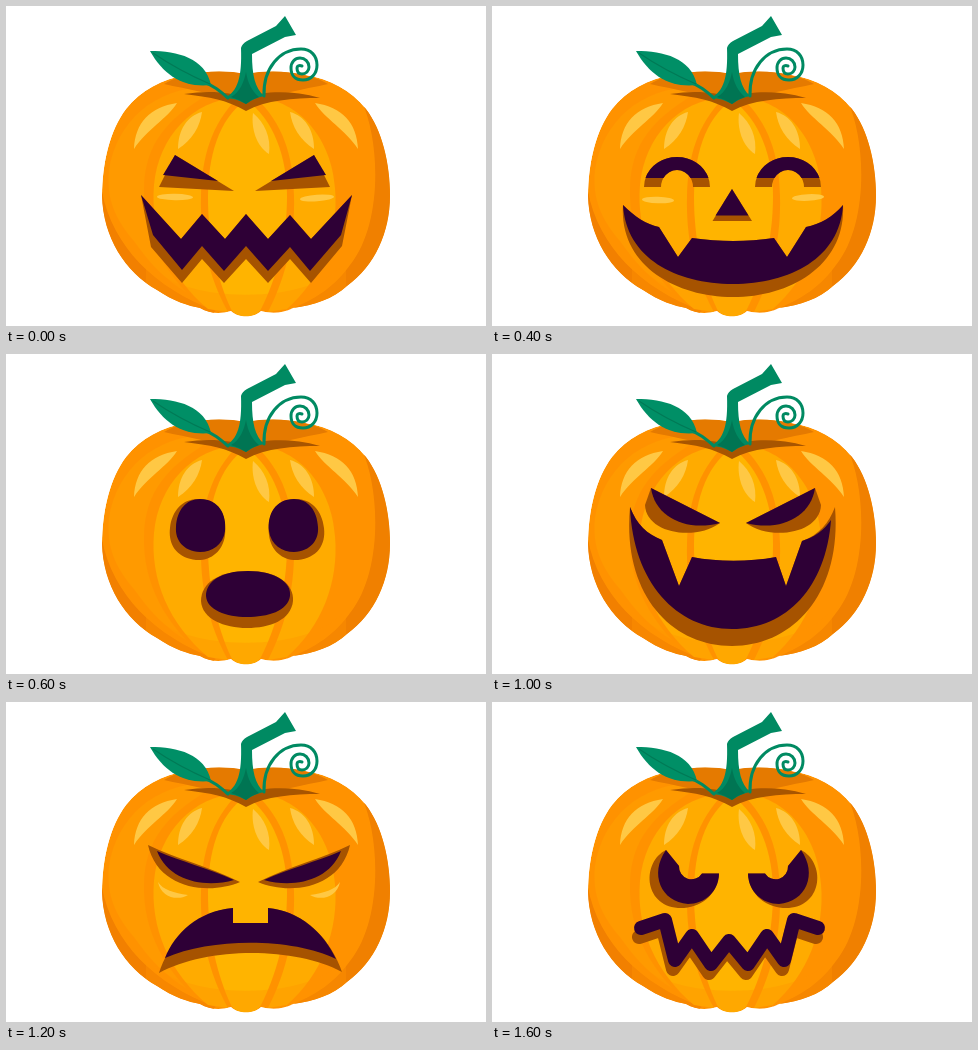
An HTML page for the animation above (1800 ms loop, 480 by 320 pixels).

```html
<!DOCTYPE html>
<html lang="en">
<head>
<meta charset="utf-8">
<title>Pumpkin faces</title>
<style>
  html, body { margin: 0; width: 100%; height: 100%; overflow: hidden; background: #fff; }
  svg { display: block; width: 480px; height: 320px; }
  .face { opacity: 0; }
  .cut { fill: #a65300; }
  .hole { fill: #2e0036; }
  .shine { fill: #ffc844; }
  .line { fill: none; stroke-width: 14; stroke-linecap: round; stroke-linejoin: round; }
  .cut.line { fill: none; stroke: #a65300; }
  .hole.line { fill: none; stroke: #2e0036; }
</style>
</head>
<body>
<svg id="stage" viewBox="0 0 480 320">
  <defs>
    <clipPath id="skin"><path id="body" d="M240 68C220 64 198 65 181 69C156 73 135 84 120 103C104 124 96 157 96 190C97 231 119 266 151 284C167 295 183 300 194 302C204 308 215 308 225 305C232 312 248 312 255 305C266 308 278 307 287 302C308 299 327 293 341 280C369 260 384 226 384 190C384 157 376 124 360 103C345 84 324 73 299 69C282 65 260 64 240 68Z"/></clipPath>
  </defs>
  <g clip-path="url(#skin)">
    <use href="#body" fill="#ff9200"/>
    <path fill="#f28000" d="M94 172C100 233 143 280 210 305L190 320L90 300Z"/>
    <path fill="#f08000" d="M356 96C374 135 377 218 344 259C329 280 311 293 280 305L300 320H390V90Z"/>
    <path fill="#ff9a00" d="M214 82C154 76 111 113 103 164C100 192 109 213 128 235C143 257 161 275 180 286C150 254 137 218 138 182C139 139 160 110 214 82Z"/>
    <path fill="#e57a00" d="M158 78C190 58 290 58 322 78C300 83 268 88 240 98C212 88 180 83 158 78Z"/>
    <path fill="#ffab00" d="M232 91C186 95 153 130 148 179C144 226 163 270 202 303L222 306C202 269 194 232 195 190C196 151 205 119 232 91Z"/>
    <path fill="#ffab00" d="M249 91C295 94 326 135 329 182C333 228 316 272 281 303L262 306C282 267 289 228 288 190C287 149 277 117 249 91Z"/>
    <path fill="#ffb400" d="M240 94C212 113 202 152 202 191C202 235 211 273 225 303C230 313 250 313 255 303C271 271 281 234 281 190C281 152 268 113 240 94Z"/>
    <path fill="#ff9200" opacity=".35" d="M140 255C170 300 310 300 340 255V320H140Z"/>
  </g>
  <g class="shine">
    <path d="M128 143C129 117 144 101 171 97C161 113 141 123 128 143Z"/>
    <path d="M172 143C172 124 181 110 196 106C194 121 186 134 172 143Z"/>
    <path d="M247 107C259 117 265 131 263 148C250 140 245 122 247 107Z"/>
    <path d="M308 143C308 124 299 110 284 106C286 121 294 134 308 143Z"/>
    <path d="M352 143C351 117 336 101 309 97C319 113 339 123 352 143Z"/>
  </g>
  <path fill="#a85500" d="M178 88C203 84 224 86 240 92C257 85 285 84 314 92C287 92 260 94 240 105C221 94 204 91 178 88Z"/>
  <g fill="none" stroke="#008a62" stroke-linecap="round" stroke-width="3">
    <path d="M258 90C257 62 274 43 295 43C305 43 311 50 311 59C311 68 305 74 297 74C289 74 285 69 285 62C285 56 289 52 294 52C299 52 303 56 303 61C303 65 300 68 296 68C292 68 291 65 291 62C291 60 293 59 296 60"/>
    <path d="M197 76C207 79 214 85 222 92"/>
  </g>
  <path fill="#008f66" d="M144 45C172 45 199 52 205 79C178 82 158 70 144 45Z"/>
  <path fill="none" stroke="#007a56" stroke-width="1.2" d="M147 47C166 60 183 69 204 78"/>
  <path fill="#008a62" d="M219 92C232 85 236 71 235 42Q236 38 241 35L270 20L279 10L290 29L279 31L246 48C246 69 249 82 258 90Q248 92 240 98Q230 92 219 92Z"/>
  <path fill="#007553" d="M240 98Q232 93 225 91C234 86 238 76 240 66C242 78 246 85 253 91Q246 93 240 98Z"/>
</svg>
<script>
const STEP = 200;
const stage = document.getElementById('stage');

const path = (kind, d) => `<path class="${kind}" d="${d}"/>`;
const carve = (cut, hole) => path('cut', cut) + path('hole', hole);
// Draws a part and its mirror image about x = axis.
const pair = (part, axis) =>
  part + `<g transform="matrix(-1 0 0 1 ${2 * axis} 0)">${part}</g>`;
const cheek = (x, y, rx = 17, tilt = 0) =>
  `<ellipse class="shine" cx="${x}" cy="${y}" rx="${rx}" ry="3.3" transform="rotate(${tilt} ${x} ${y})"/>`;
const zigzag = 'M149 226L173 218L183 258L200 234L219 262L237 239L256 262L275 234L292 258L302 218L326 226';

const faces = [
  // Jagged grin
  pair(carve('M169 149L228 185L153 181Z', 'M169 149L212 175L157 169Z'), 238.5) +
  carve('M135 189L175 233L196 208L219 233L240 208L262 233L284 209L305 233L346 189L336 240L305 277L284 253L262 277L240 253L218 277L196 253L176 277L145 241Z',
        'M135 189L175 233L196 208L219 233L240 208L262 233L284 209L305 233L346 189L335 229L304 265L284 241L262 265L240 240L218 265L196 240L176 264L147 229Z') +
  cheek(169, 191, 18, 1) + cheek(311, 192, 17, -4),

  // Toothed smile
  pair(carve('M178 144L216 186L153 181Z', 'M178 144L209 177L158 173Z'), 240) +
  carve('M240 182L259 214H221Z', 'M240 182L255 207H225Z') +
  carve('M135 199C160 221 181 226 200 228V244H220V230H261V244H281V228C302 225 325 218 347 199C343 254 298 285 240 285S138 254 135 199Z',
        'M135 199C160 221 181 226 200 228V244H220V230H261V244H281V228C302 225 325 218 347 199C339 246 297 272 240 272S143 246 135 199Z') +
  cheek(166, 193, 16) + cheek(314, 193, 16),

  // Happy fangs
  pair(carve('M152 181A33 30 0 0 1 218 181H201A16 17 0 0 0 169 181Z',
             'M153.5 172A33 30 0 0 1 216.5 172H198.5A16 17 0 0 0 171.5 172Z'), 240.5) +
  carve('M240 183L260 215H220.5Z', 'M240 183L256.5 209.5H223.5Z') +
  carve('M131 199C143 211 154 218 167 221L186 251L200 232C228 236 255 236 282 232L295 251L314 221C328 218 341 211 351 199C354 258 300 291 241 291S127 258 131 199Z',
        'M131 199C143 211 154 218 167 221L186 251L200 232C228 236 255 236 282 232L295 251L314 221C328 218 341 211 351 199C348 252 298 278 241 278S134 252 131 199Z') +
  cheek(166, 194, 16, 2) + cheek(316, 191.5, 16, -3),

  // Surprise
  pair(carve('M192 145C213 145 221 161 219 181C217 198 204 207 190 206C171 204 162 191 164 174C166 156 177 145 192 145Z',
             'M194 145C213 145 221 161 219 177C217 191 206 198 194 198C177 197 169 186 170 173C171 156 180 145 194 145Z'), 241) +
  carve('M242 217C272 217 288 230 287 247C285 266 264 274 241 274S196 265 195 247C195 229 213 217 242 217Z',
        'M242 217C270 217 286 229 284 242C282 257 262 263 241 263S201 256 200 242C200 228 214 217 242 217Z'),

  // Sulk
  pair(carve('M181 147C156 161 157 210 198 215C220 217 236 203 237 183C213 181 192 170 181 147Z',
             'M181 147C192 170 213 181 237 183C236 201 223 213 207 212C177 211 164 175 181 147Z') +
       path('shine', 'M159 193C164 207 175 216 190 221C175 228 156 211 159 193Z'), 241.5) +
  carve('M173 273C183 242 211 225 242 225C276 225 304 245 312 273C275 254 210 253 173 273Z',
        'M179 262C190 239 214 225 242 225C272 225 297 241 307 263C276 246 213 245 179 262Z'),

  // Wicked laugh
  pair(carve('M159 134L228 169C204 187 154 180 153 151Z',
             'M159 134L228 169C194 178 163 163 159 134Z'), 241) +
  carve('M138 153C145 171 155 180 170 186L187 232L200 203C226 208 257 208 284 203L294 232L310 187C327 181 337 169 343 153C350 240 301 292 240 292S130 240 138 153Z',
        'M138 153C145 171 155 180 170 186L187 232L200 203C226 208 257 208 284 203L294 232L310 187C323 183 332 176 339 166C334 233 295 275 240 275S141 229 138 153Z'),

  // Scowl
  pair(carve('M142 143C171 157 202 164 234 180C204 193 152 188 142 143Z',
             'M151 149C176 160 202 166 228 178C200 186 163 180 151 149Z') +
       path('shine', 'M152 180C157 188 168 191 182 193C172 199 155 196 152 180Z'), 243) +
  carve('M153 271C162 243 188 209 227 206V221H262V206C300 209 326 240 336 270C290 245 202 244 153 271Z',
        'M159 256C169 231 192 209 227 206V221H262V206C294 209 318 231 330 257C288 236 206 235 159 256Z'),

  // Square-toothed grin
  pair(carve('M164 147L224 178C215 196 180 202 164 181Z',
             'M164 147L224 178C207 188 180 190 167 173Z'), 238) +
  carve('M141 211C172 224 187 226 201 226V242H222V229H255V242H275V226C292 225 312 221 335 211C326 256 288 279 238 279S149 256 141 211Z',
        'M141 211C172 224 187 226 201 226V242H222V229H255V242H275V226C292 225 312 221 335 211C324 247 286 266 238 266S152 247 141 211Z'),

  // Wobbly grimace
  pair(carve('M174 148C150 160 151 203 186 206C207 207 225 195 227 171.5H210A12.5 12.5 0 0 1 187 164Z',
             'M174 148L187 164A12.5 12.5 0 0 0 210 171.5H227C227 190 212 202 196 202C169 200 157 172 174 148Z'), 241.5) +
  `<g transform="translate(-2 9)">${path('cut line', zigzag)}</g>` + path('hole line', zigzag)
];

const total = STEP * faces.length;
const share = 1 / faces.length;

faces.forEach((art, i) => {
  const face = document.createElementNS('http://www.w3.org/2000/svg', 'g');
  face.setAttribute('class', 'face');
  face.innerHTML = art;
  stage.append(face);
  face.animate([
    { opacity: 1, offset: 0 },
    { opacity: 1, offset: share },
    { opacity: 0, offset: share },
    { opacity: 0, offset: 1 }
  ], { duration: total, delay: i ? i * STEP - total : 0, iterations: Infinity });
});
</script>
</body>
</html>
```
